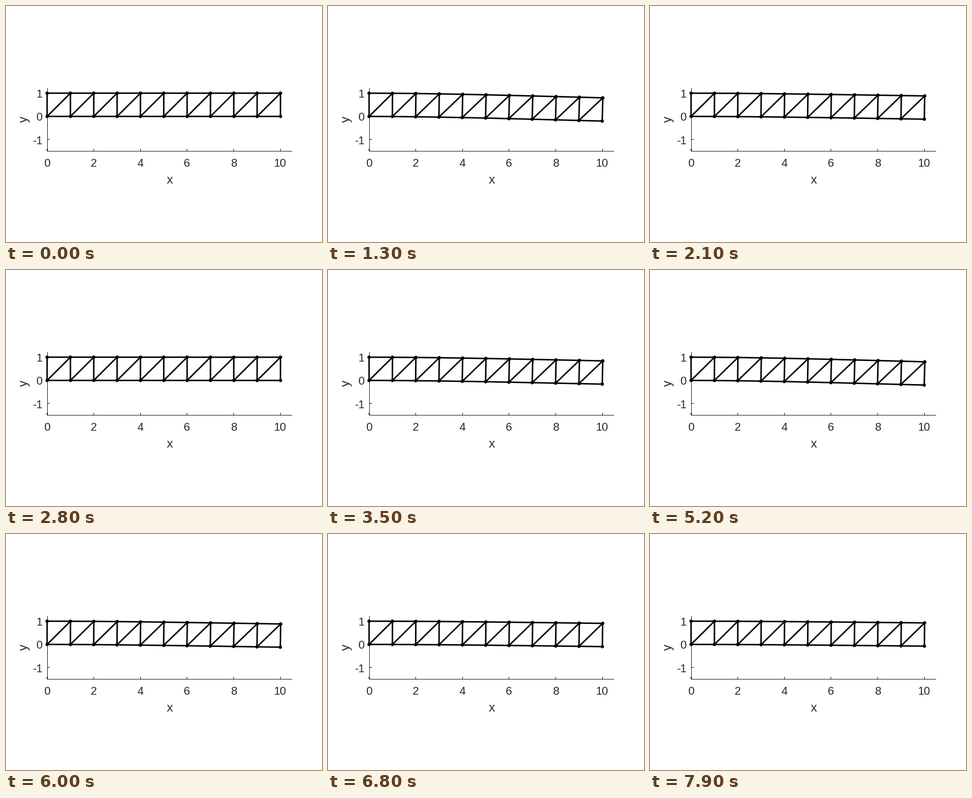
Animation of 560x420 px, one loop 8000 ms. Source, as a matplotlib script:

```python
import numpy as np
import matplotlib.pyplot as plt
from matplotlib.animation import FuncAnimation
from matplotlib.collections import LineCollection

W, H, DPI = 560, 420, 80
PX = 72 / DPI                    # points per pixel
FRAMES, STEP_MS = 80, 100
BAYS = 10
SWING = 0.134                    # static tip deflection
PHASE = np.radians(64.6)         # phase advance per step
INK = "#262626"

SCALE = 41.36
X0, Y0 = 72.8, 196.5             # pixel position of (0, 0)
LEFT, BASE = 73, 258             # pixel column and row of the axes


def to_px(p):
    return np.column_stack([X0 + SCALE * p[:, 0], Y0 - SCALE * p[:, 1]])


# Nodes 0..BAYS form the bottom chord, the rest the top chord
n = BAYS + 1
nodes = np.array([(x, y) for y in (0, 1) for x in range(n)], float)
bars = [(i, i + n) for i in range(n)]
for i in range(BAYS):
    bars += [(i, i + 1), (i + n, i + n + 1), (i, i + n + 1)]
bars = np.array(bars)


def bending_mode():
    """Lowest vibration mode of the truss, scaled to a unit drop at the tip."""
    k = np.zeros((4 * n, 4 * n))
    for a, b in bars:
        d = nodes[b] - nodes[a]
        length = np.hypot(*d)
        v = np.concatenate([-d, d]) / length
        dof = [2 * a, 2 * a + 1, 2 * b, 2 * b + 1]
        k[np.ix_(dof, dof)] += np.outer(v, v) / length
    free = np.repeat(nodes[:, 0] > 0, 2)
    mode = np.zeros(4 * n)
    mode[free] = np.linalg.eigh(k[np.ix_(free, free)])[1][:, 0]
    mode = mode.reshape(-1, 2)
    return -mode / mode[BAYS, 1]


MODE = bending_mode()

fig = plt.figure(figsize=(W / DPI, H / DPI), dpi=DPI, facecolor="white")
ax = fig.add_axes([0, 0, 1, 1])
ax.set_xlim(0, W)
ax.set_ylim(H, 0)
ax.axis("off")


def hline(x1, x2, y):
    y = np.floor(y) + 0.5
    ax.plot([x1, x2], [y, y], color=INK, lw=PX, solid_capstyle="butt", snap=False)


def vline(x, y1, y2):
    x = np.floor(x) + 0.5
    ax.plot([x, x], [y1, y2], color=INK, lw=PX, solid_capstyle="butt", snap=False)


def label(x, y, s, size=20, ha="center", rotation=0):
    ax.text(x, y, s, fontsize=size * PX, family="Liberation Sans", color=INK,
            ha=ha, va="baseline", rotation=rotation, rotation_mode="anchor")


hline(LEFT, 507, BASE)
vline(LEFT, 146, BASE + 1)
for v in range(0, 11, 2):
    x = X0 + SCALE * v
    vline(x, BASE - 4, BASE)
    label(x - 0.3, 286, str(v))
for v in (-1, 0, 1):
    y = Y0 - SCALE * v
    hline(LEFT, LEFT + 5, y)
    label(64.5, y + 7.8, str(v), ha="right")
label(290, 315.5, "x", 22)
label(37.5, 201.5, "y", 22, rotation=90)

truss = LineCollection([], colors="black", linewidths=2.6 * PX,
                       snap=False, zorder=3)
ax.add_collection(truss, autolim=False)
# One size per joint keeps the dots at sub-pixel positions
joints = ax.scatter(*to_px(nodes).T, s=np.full(2 * n, (6 * PX) ** 2),
                    color="black", linewidths=0, snap=False, zorder=4)


def update(i):
    p = to_px(nodes + SWING * (1 - np.cos(PHASE * i)) * MODE)
    truss.set_segments(p[bars])
    joints.set_offsets(p)
    return truss, joints


anim = FuncAnimation(fig, update, frames=FRAMES, interval=STEP_MS,
                     repeat=True, repeat_delay=0)
plt.show()
```
